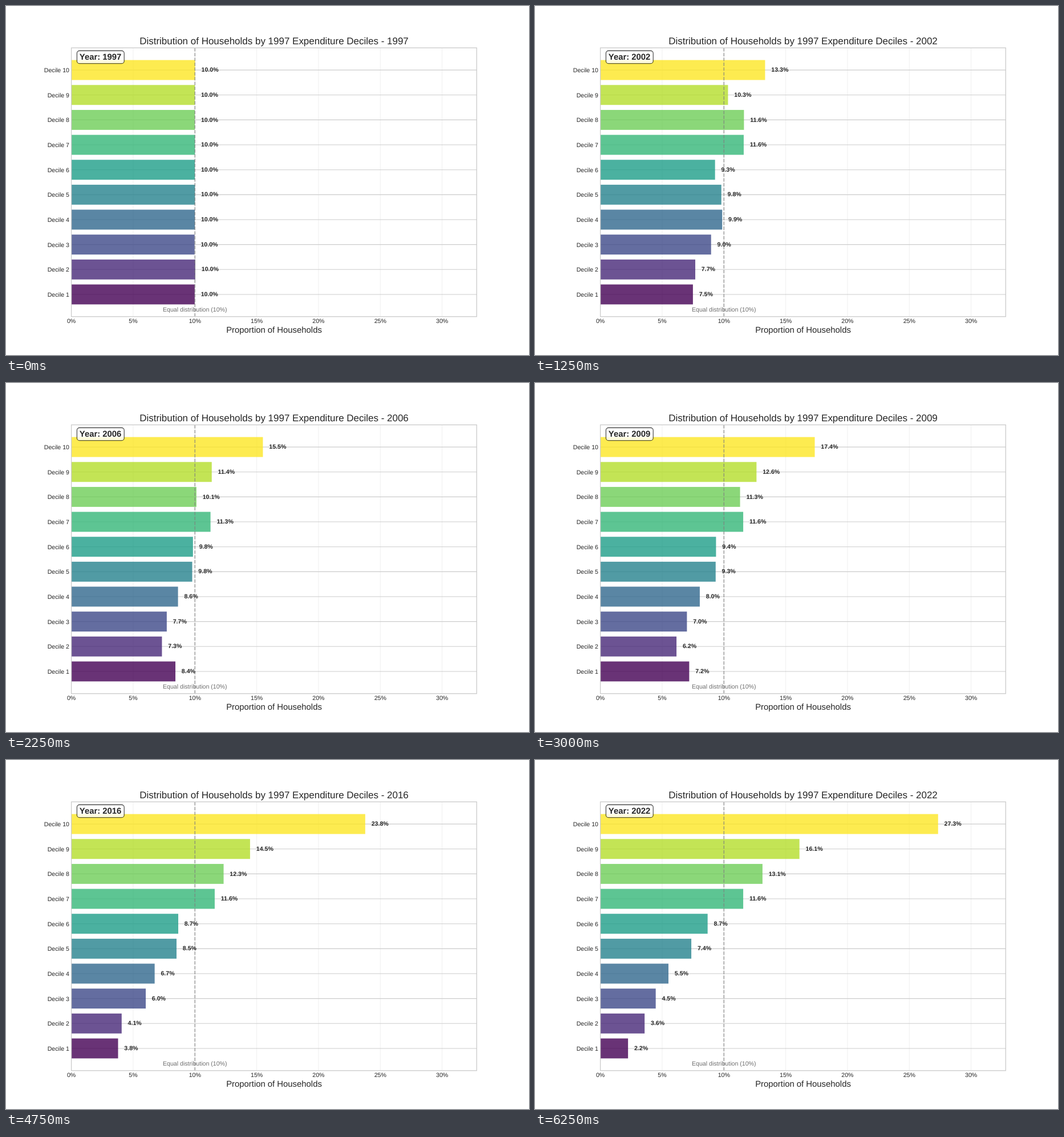
These frames come from a looping animation (917 by 611 pixels, 6500 ms). An HTML page:

```html
<!DOCTYPE html>
<html lang="en">
<head>
<meta charset="utf-8">
<title>Household deciles</title>
<style>
  html, body { margin: 0; width: 100%; height: 100%; overflow: hidden; background: #fff; }
  svg { display: block; width: 100%; height: 100%; }
  text {
    font: 10.61px Arial, "Liberation Sans", sans-serif;
    fill: #262626;
    text-rendering: geometricPrecision;
  }
  .title { font-size: 16.98px; }
  .axis { font-size: 14.86px; }
  .year { font-size: 14.86px; font-weight: bold; }
  .value { font-weight: bold; }
  .note { fill: #808080; fill: #6e6e6e; }
  .mid { text-anchor: middle; }
  .end { text-anchor: end; }
</style>
</head>
<body>
<svg id="chart" viewBox="0 0 917 611"></svg>
<script>
const LEFT = 114.6, RIGHT = 825.3, TOP = 73.3, BOTTOM = 543.8;
const UNIT = 21.667, ROW = 43.65, BAR = 34.92;
const FIRST_YEAR = 1997, YEARS = 26, STEP = 250;
const COLORS = ["#440154", "#482878", "#3e4989", "#31688e", "#26828e",
                "#1f9e89", "#35b779", "#6ece58", "#b5de2b", "#fde725"];

// Shares in percent, decile 1 to 10; years between are interpolated.
const SHARES = {
  1997: [9.98, 10.03, 9.97, 9.99, 10, 9.99, 10, 9.99, 9.99, 10.02],
  2002: [7.49, 7.68, 8.96, 9.86, 9.79, 9.28, 11.6, 11.62, 10.33, 13.33],
  2006: [8.42, 7.33, 7.72, 8.63, 9.78, 9.84, 11.26, 10.12, 11.36, 15.5],
  2012: [5.96, 4.99, 6.29, 7.46, 8.88, 8.88, 11.86, 12.49, 13.91, 19.2],
  2016: [3.78, 4.07, 6.02, 6.74, 8.51, 8.65, 11.6, 12.32, 14.46, 23.78],
  2017: [3.44, 4.26, 6.06, 6.79, 8.23, 8.43, 11.64, 12.46, 14.55, 24.14],
  2019: [3.19, 4.63, 6.13, 6.89, 7.67, 7.99, 11.72, 12.74, 14.72, 24.26],
  2022: [2.24, 3.58, 4.48, 5.51, 7.36, 8.68, 11.56, 13.12, 16.11, 27.33]
};
const KEYS = Object.keys(SHARES).map(Number);

const chart = document.getElementById("chart");

function add(tag, attrs, content = "") {
  const node = document.createElementNS("http://www.w3.org/2000/svg", tag);
  for (const name in attrs) node.setAttribute(name, attrs[name]);
  node.textContent = content;
  return chart.appendChild(node);
}
const label = (x, y, kind, content) => add("text", { x, y, class: kind }, content);
const line = (x1, y1, x2, y2, more) =>
  add("line", { x1, y1, x2, y2, stroke: "#ccc", "stroke-width": 1.06, ...more });
const toX = share => LEFT + share * UNIT;
const toY = row => BOTTOM - (row + 0.89) * ROW;

for (let p = 0; p <= 30; p += 5) {
  line(toX(p), TOP, toX(p), BOTTOM, { opacity: 0.3 });
  label(toX(p), 555.4, "mid", p + "%");
}
COLORS.forEach((_, i) => {
  line(LEFT, toY(i), RIGHT, toY(i));
  label(111, toY(i) + 3.9, "end", "Decile " + (i + 1));
});
const bars = COLORS.map((fill, i) =>
  add("rect", { x: LEFT, y: toY(i) - BAR / 2, height: BAR, fill, opacity: 0.8 }));
line(toX(10), BOTTOM, toX(10), TOP,
  { stroke: "#808080", "stroke-width": 1.59, "stroke-dasharray": "5.89 2.55", opacity: 0.7 });
add("rect", { x: LEFT, y: TOP, width: RIGHT - LEFT, height: BOTTOM - TOP,
  fill: "none", stroke: "#ccc", "stroke-width": 1.33 });

const values = COLORS.map((_, i) => label(0, toY(i) + 3.1, "value"));
label(toX(10), 534.8, "note mid", "Equal distribution (10%)");
label(470, 572.4, "axis mid", "Proportion of Households");
const title = label(470, 66.9, "title mid");
add("rect", { x: 124.4, y: 78.4, width: 82.8, height: 22.4, rx: 4.46,
  fill: "#fff", stroke: "#000", "stroke-width": 1.06, opacity: 0.8 });
const badge = label(128.8, 93.6, "year");

function sharesIn(year) {
  const k = Math.max(1, KEYS.findIndex(key => key >= year));
  const from = KEYS[k - 1], to = KEYS[k];
  const t = (year - from) / (to - from);
  return SHARES[from].map((a, i) => a + (SHARES[to][i] - a) * t);
}

let shown = 0;
function draw(now) {
  const year = FIRST_YEAR + Math.floor(now / STEP) % YEARS;
  if (year !== shown) {
    shown = year;
    title.textContent = "Distribution of Households by 1997 Expenditure Deciles - " + year;
    badge.textContent = "Year: " + year;
    sharesIn(year).forEach((share, i) => {
      bars[i].setAttribute("width", share * UNIT);
      values[i].setAttribute("x", toX(share + 0.5));
      values[i].textContent = share.toFixed(1) + "%";
    });
  }
  requestAnimationFrame(draw);
}
draw(performance.now());
</script>
</body>
</html>
```
